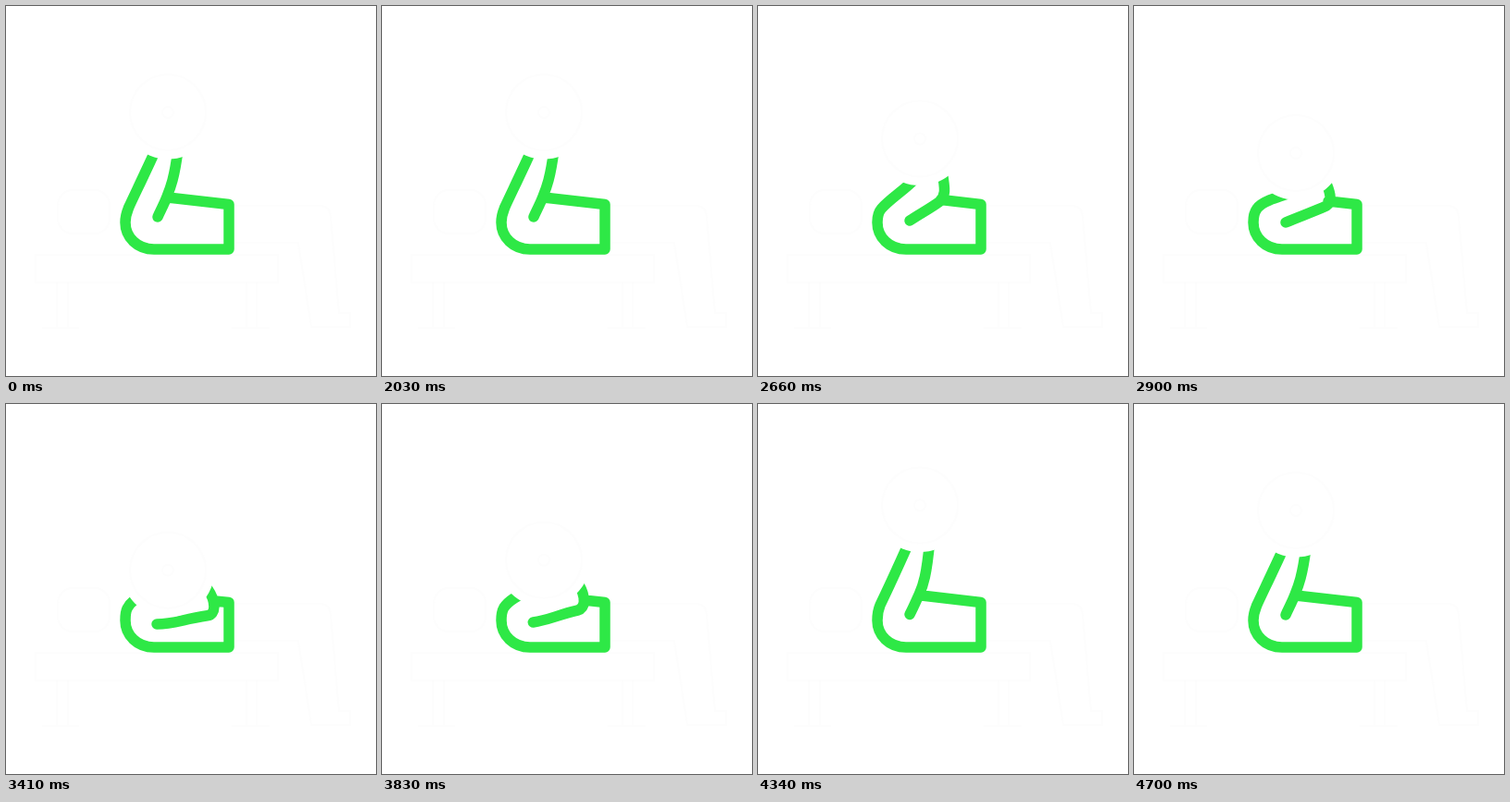
Recreate the animation shown at these times as an HTML page without scripts. Size 400 by 400 pixels, loop 4730 ms.

```html
<!DOCTYPE html>
<html lang="en">
<head>
<meta charset="utf-8">
<title>Bench press</title>
<style>
  html, body { margin: 0; width: 100%; height: 100%; overflow: hidden; background: #fff; }
  svg { display: block; width: 100%; height: 100%; fill: none; stroke-linecap: round; stroke-linejoin: round; }
  .body { stroke: #2ee846; stroke-width: 11.5; }
  .faint { stroke: #fdfdfd; stroke-width: 2; }
</style>
</head>
<body>
<svg viewBox="0 0 400 400">
  <g class="faint">
    <rect x="32" y="269" width="262" height="30"/>
    <path d="M55 300V347M67 300V347M40 348H78M260 300V347M271 300V347M245 348H284"/>
    <rect x="56" y="199" width="56" height="47" rx="16"/>
    <path d="M250 216H340Q350 216 351 228L360 332H372V347H330L316 256H250"/>
  </g>

  <!-- Each pose: torso and left arm, top edge of the torso, right arm -->
  <path class="body" d="M241 214.500V263H160C142 263 129 250 129 234C129 226 131 222 133 217C140 202 152 177 163 153M175 207L241 214.500M164 228C167 221 171 214 174 206C178 196 182 186 186 155">
    <animate attributeName="d" dur="4.73s" repeatCount="indefinite" calcMode="spline"
      keyTimes="0;.4292;.5116;.6131;.7336;.8668;.9366;.9937;1"
      keySplines="0 0 1 1;.4 0 .7 .5;0 0 1 1;.3 .44 .65 1;.45 0 .7 .52;.4 .5 .6 1;.4 0 .6 1;0 0 1 1"
      values="M241 214.5V263H160C142 263 129 250 129 234C129 226 131 222 133 217C140 202 152 177 163 153M175 207L241 214.5M164 228C167 221 171 214 174 206C178 196 182 186 186 155;
              M241 214.5V263H160C142 263 129 250 129 234C129 226 131 222 133 217C140 202 152 177 163 153M175 207L241 214.5M164 228C167 221 171 214 174 206C178 196 182 186 186 155;
              M241 214.5V263H160C142 263 129 250 129 234C129 227 130 223 134 219C148 204 170 188 169 168M186 208L241 214.5M164 230C171 222 178 215 184 207C192 198 192 194 190 166;
              M241 214.5V263H160C142 263 129 250 129 234C129 227 130 223 133 219C138 212 150 208 176 200M210 211L241 214.5M164 234C178 228 195 222 208 216C214 212 213 204 208 192;
              M241 214.5V263H160C142 263 129 250 129 234C129 229 129 225 131 221C134 215 138 211 150 207M226 213L241 214.5M163 238C182 238 190 233 218 229C227 228 228 214 218 200;
              M241 214.5V263H160C142 263 129 250 129 234C129 227 130 223 133 219C141 210 155 202 185 189M203 210L241 214.5M164 232C175 226 188 219 198 212C207 206 207 200 202 184;
              M241 214.5V263H160C142 263 129 250 129 234C129 226 130 222 132 217C139 202 150 176 162 144M172 206.500L241 214.5M164 227C167 220 169 213 172 205C176 195 180 183 184 146;
              M241 214.5V263H160C142 263 129 250 129 234C129 226 131 222 133 217C140 202 152 177 163 153M175 207L241 214.5M164 228C167 221 171 214 174 206C178 196 182 186 186 155;
              M241 214.5V263H160C142 263 129 250 129 234C129 226 131 222 133 217C140 202 152 177 163 153M175 207L241 214.5M164 228C167 221 171 214 174 206C178 196 182 186 186 155"/>
  </path>

  <!-- The weight plate covers the hands -->
  <g transform="translate(175 115)">
    <animateTransform attributeName="transform" type="translate" dur="4.73s" repeatCount="indefinite" calcMode="spline"
      keyTimes="0;.4292;.5116;.6131;.7336;.8668;.9366;.9937;1"
      keySplines="0 0 1 1;.4 0 .7 .5;0 0 1 1;.3 .44 .65 1;.45 0 .7 .52;.4 .5 .6 1;.4 0 .6 1;0 0 1 1"
      values="175 115;175 115;175 128;175 159;175 180;175 147;175 106;175 115;175 115"/>
    <circle r="50.5" fill="#fff"/>
    <circle class="faint" r="41"/>
    <circle class="faint" r="6"/>
  </g>
</svg>
</body>
</html>
```
